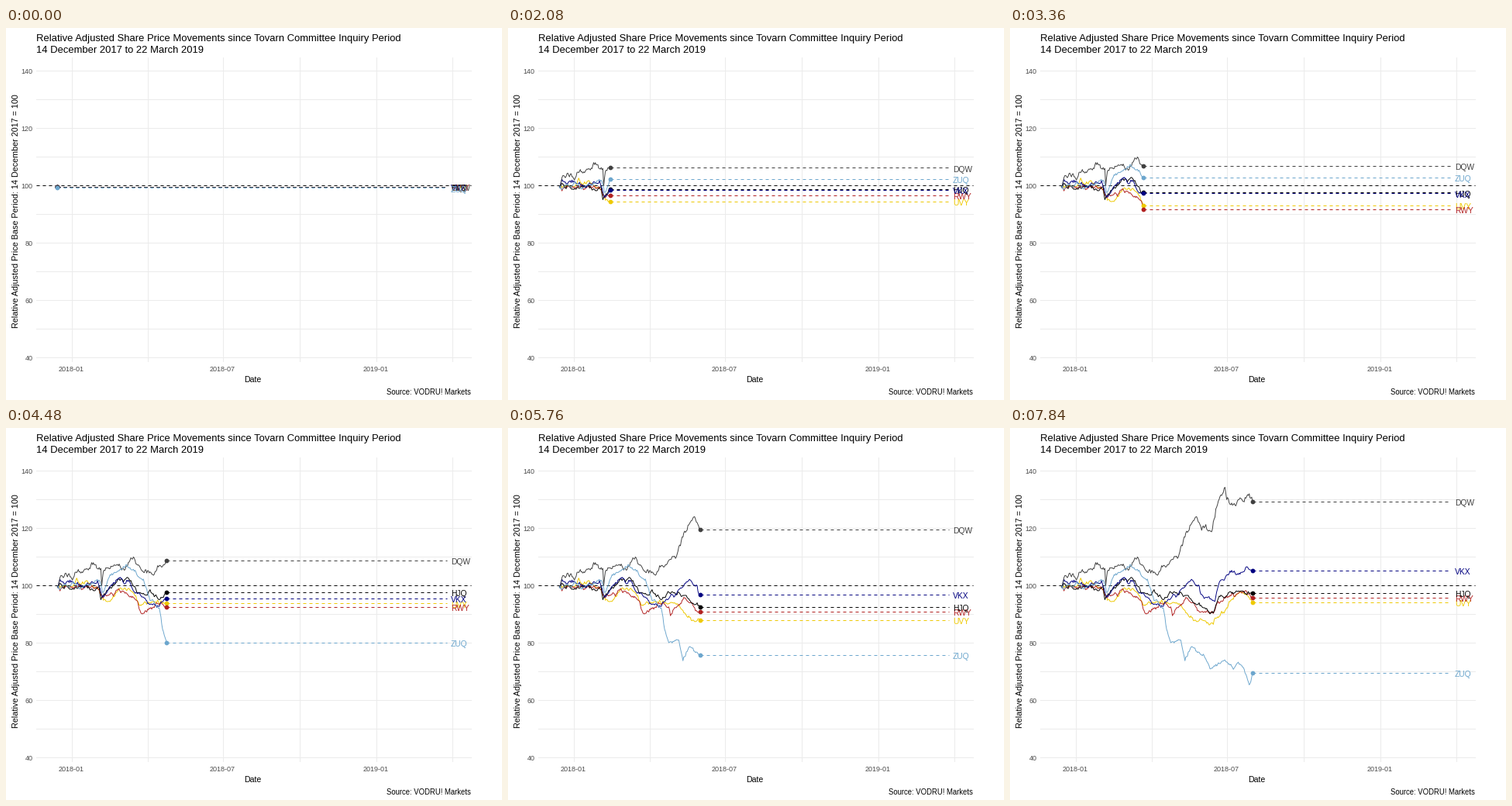
Animation of 640 by 480 pixels, one loop 8 s. Source, as a matplotlib script:

```python
import numpy as np
import matplotlib.pyplot as plt
from matplotlib.animation import FuncAnimation

W, H, DPI = 640, 480, 80
PX = 72 / DPI                 # points per pixel
FRAMES, STEP = 50, 160
LEFT, RIGHT, TOP, BOTTOM = 39, 600, 38, 430
SPEED = 463 / 99              # days revealed per frame

plt.rcParams["font.family"] = "Liberation Sans"
fig = plt.figure(figsize=(W / DPI, H / DPI), dpi=DPI, facecolor="white")
ax = fig.add_axes([0, 0, 1, 1])
ax.set(xlim=(0, W), ylim=(H, 0))
ax.axis("off")


def day_x(day):
    return 66.4 + 1.0766 * day


def price_y(price):
    return 203.4 - 3.7 * (price - 100)


def stroke(x, y, color, z, dashed=False, width=1):
    return ax.plot(x, y, color=color, lw=width * PX, zorder=z,
                   ls=(0, (4, 4)) if dashed else "-",
                   dash_capstyle="butt", solid_joinstyle="round")[0]


def label(x, y, text, size, color="black", ha="left", z=8, **kw):
    return ax.text(x, y, text, fontsize=size * PX, color=color, ha=ha,
                   va="baseline", zorder=z, **kw)


# Grid, axes and captions
for price in range(40, 141, 10):
    y = price_y(price)
    stroke([LEFT, RIGHT], [y, y], "#EBEBEB", 0)
    if price % 20 == 0:
        label(34.5, y + 4, str(price), 9, "#4D4D4D", "right")
for x, text in ((85, "2018-01"), (183, ""), (280, "2018-07"),
                (379, ""), (478, "2019-01"), (576, "")):
    stroke([x, x], [TOP, BOTTOM], "#EBEBEB", 0)
    label(x - 0.5, 443, text, 9, "#4D4D4D", "center")
stroke([LEFT, RIGHT], [price_y(100)] * 2, "black", 1, dashed=True)

label(39, 17, "Relative Adjusted Share Price Movements since "
      "Tovarn Committee Inquiry Period", 13)
label(39, 32, "14 December 2017 to 22 March 2019", 13)
label(15.5, 387, "Relative Adjusted Price Base Period: "
      "14 December 2017 = 100", 10.8, rotation=90, rotation_mode="anchor")
label(318.5, 457, "Date", 10.5, ha="center")
label(600, 473, "Source: VODRU! Markets", 9.5, ha="right")


def daily_prices(turns, rng, swing):
    """Daily random walk tied to the turning points (day, price)."""
    days, prices = np.array(turns, float).T
    t = np.arange(days[-1] + 1)
    walk = rng.normal(0, swing, t.size).cumsum()
    drift = np.interp(t, days, np.interp(days, t, walk))
    return t, np.interp(t, days, prices) + walk - drift


class Share:
    def __init__(self, name, color, z, *turns, swing=0.4):
        rng = np.random.default_rng(z)
        self.days, self.prices = daily_prices(turns, rng, swing)
        self.line = stroke([], [], color, 2 + z / 10, width=0.95)
        self.guide = stroke([], [], color, 3 + z / 10, dashed=True)
        self.dot = ax.plot([], [], "o", color=color, ms=5.8 * PX, mew=0,
                           zorder=4 + z / 10)[0]
        self.tag = label(574, 0, name, 10.2, color, z=6 + z / 10)

    def reveal(self, day):
        seen = self.days < day
        price = np.interp(day, self.days, self.prices)
        x, y = day_x(day), price_y(price)
        self.line.set_data(day_x(np.r_[self.days[seen], day]),
                           price_y(np.r_[self.prices[seen], price]))
        self.guide.set_data([x, 569], [y, y])
        self.dot.set_data([x], [y])
        self.tag.set_y(y + 5.2)
        return self.line, self.guide, self.dot, self.tag


shares = [
    Share("UVY", "#EEC900", 1,
          (0, 99.5), (17, 99.5), (24, 102), (28, 100.5), (48, 99.2),
          (55, 94.9), (61, 94.5), (73, 98.6), (86, 98.9), (98, 93.1),
          (131, 93.8), (140, 93.5), (150, 90.5), (168, 88.1), (182, 86.5),
          (205, 95.4), (216, 97.8), (229, 94.2)),
    Share("RWY", "#B22222", 2,
          (0, 99.5), (28, 99.2), (48, 98.9), (55, 95.7), (61, 96.6),
          (73, 98.9), (96, 94.5), (98, 91.8), (107, 90.8), (119, 94),
          (131, 92.6), (133, 89.5), (150, 95.7), (168, 90.9), (182, 90.3),
          (187, 94.1), (214, 98), (229, 95.8)),
    Share("HJQ", "black", 3,
          (0, 99.6), (3, 100.8), (28, 99.5), (50, 99.5), (52, 95.1),
          (61, 98.8), (73, 102.2), (86, 102.2), (98, 97.6), (127, 95.9),
          (131, 97.7), (153, 95.9), (168, 92.8), (182, 90.5), (188, 95.6),
          (213, 98), (229, 97.4)),
    Share("VKX", "#000080", 4,
          (0, 99.5), (3, 102.2), (28, 100.3), (48, 101.8), (54, 95.9),
          (61, 98.7), (72, 101.9), (85, 101.9), (98, 97.4), (110, 93.5),
          (131, 95.5), (156, 102.2), (165, 100), (168, 96.9), (183, 94.6),
          (190, 101.6), (207, 105.1), (229, 105.3)),
    Share("DQW", "#404040", 5,
          (0, 99.7), (3, 102.8), (18, 102), (21, 104.6), (28, 104.4),
          (43, 108), (52, 106), (53, 100), (55, 105), (61, 106.2),
          (80, 105.4), (88, 109.7), (98, 106.9), (113, 104), (131, 108.8),
          (139, 109.5), (150, 119), (160, 123.6), (168, 119.3), (181, 119.8),
          (188, 129.5), (196, 134.3), (198, 130), (229, 129.3), swing=0.6),
    Share("ZUQ", "#6CA6CD", 6,
          (0, 99.2), (28, 99.2), (50, 101.9), (54, 97.6), (61, 102.4),
          (83, 107.3), (98, 102.8), (122, 92.2), (125, 86.5), (131, 80.1),
          (143, 81), (148, 73.8), (158, 78.4), (168, 75.8), (178, 71),
          (217, 71.6), (225, 65.4), (229, 69.6)),
]


def draw(i):
    return [part for share in shares for part in share.reveal(i * SPEED)]


anim = FuncAnimation(fig, draw, frames=FRAMES, interval=STEP,
                     init_func=lambda: draw(0), repeat=True, repeat_delay=0)
plt.show()
```
